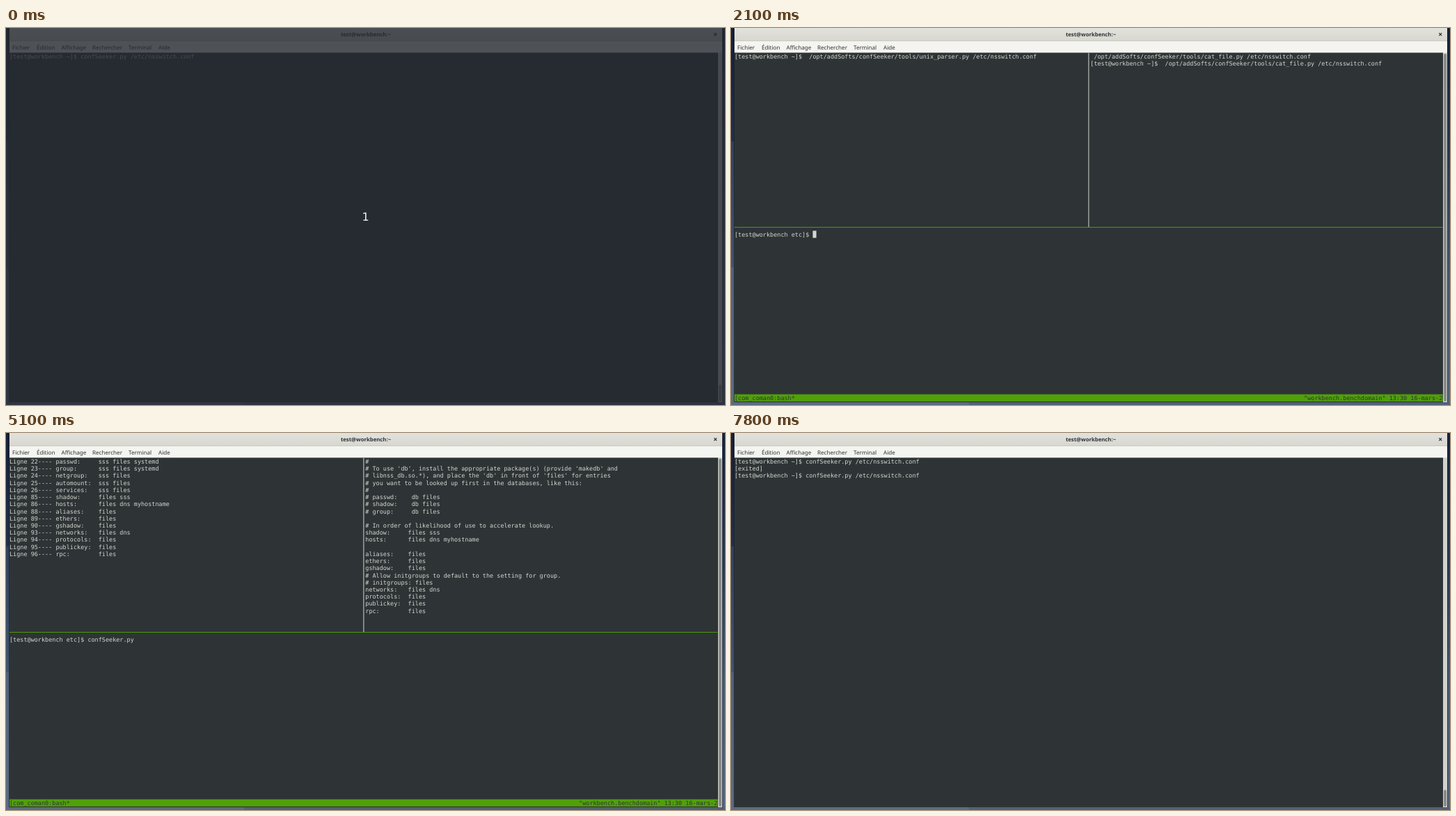
An HTML page with a canvas that plays this animation: 1033x542 px, repeating every 8 s.

```html
<!DOCTYPE html>
<html lang="fr">
<head>
<meta charset="utf-8">
<style>
html, body { margin: 0; width: 100%; height: 100%; overflow: hidden; background: #2e3436; }
canvas { display: block; }
</style>
</head>
<body>
<canvas id="stage" width="1033" height="542"></canvas>
<script>
const ctx = document.getElementById('stage').getContext('2d');
const LOOP = 8000, LEFT = 5, TOP = 36, CELL_W = 5.113, CELL_H = 10.22;
const DARK = '#2e3436', LIGHT = '#d3d7cf', GREEN = '#4e9a06';

const HOST = 'workbench';
const PROMPT = `[test@${HOST} ~]$ `;
const FILE = '/etc/nsswitch.conf';
const COMMAND = `confSeeker.py ${FILE}`;
const TOOLS = ' /opt/addSofts/confSeeker/tools/';

const entry = (key, value) => (key + ':').padEnd(12) + value;

const parsed = [
  [22, 'passwd', 'sss files systemd'], [23, 'group', 'sss files systemd'],
  [24, 'netgroup', 'sss files'], [25, 'automount', 'sss files'],
  [26, 'services', 'sss files'], [85, 'shadow', 'files sss'],
  [86, 'hosts', 'files dns myhostname'], [88, 'aliases', 'files'],
  [89, 'ethers', 'files'], [90, 'gshadow', 'files'],
  [93, 'networks', 'files dns'], [94, 'protocols', 'files'],
  [95, 'publickey', 'files'], [96, 'rpc', 'files']
].map(([line, key, value]) => `Ligne ${line}---- ${entry(key, value)}`);

const listing = [
  '#',
  "# To use 'db', install the appropriate package(s) (provide 'makedb' and",
  "# libnss_db.so.*), and place the 'db' in front of 'files' for entries",
  '# you want to be looked up first in the databases, like this:',
  '#',
  '# passwd:    db files',
  '# shadow:    db files',
  '# group:     db files',
  '',
  '# In order of likelihood of use to accelerate lookup.',
  entry('shadow', 'files sss'),
  entry('hosts', 'files dns myhostname'),
  '',
  entry('aliases', 'files'),
  entry('ethers', 'files'),
  entry('gshadow', 'files'),
  '# Allow initgroups to default to the setting for group.',
  '# initgroups: files',
  entry('networks', 'files dns'),
  entry('protocols', 'files'),
  entry('publickey', 'files'),
  entry('rpc', 'files')
];

// [start ms, text typed in the lower pane]
const typing = [
  [2100, ''], [4300, 'con'], [4500, 'conf'], [4600, 'confSeeker.py '],
  [5500, 'confSeeker.py c'], [5600, 'confSeeker.py cl'],
  [5800, 'confSeeker.py clo'], [6200, 'confSeeker.py close']
];
// Times at which the cursor turns on and off
const cursorOn = [
  [400, 1000], [1600, 2400], [3000, 3600], [4200, 5100], [5500, 6900], [7300, 7800]
];

function rect(x, y, w, h, fill) {
  ctx.fillStyle = fill;
  ctx.fillRect(x, y, w, h);
}

function gradient(y0, y1, ...colors) {
  const g = ctx.createLinearGradient(0, y0, 0, y1);
  colors.forEach((c, i) => g.addColorStop(i / (colors.length - 1), c));
  return g;
}

function label(text, x, y, font, color = DARK, align = 'left') {
  ctx.font = font;
  ctx.fillStyle = color;
  ctx.textAlign = align;
  ctx.fillText(text, x, y);
}

function print(text, row, col = 0, color = LIGHT) {
  label(text, LEFT + col * CELL_W, TOP + row * CELL_H + 8,
    '8.49px "DejaVu Sans Mono", monospace', color);
}

const printAll = (lines, col) => lines.forEach((line, row) => print(line, row, col));

function drawWindow(split) {
  rect(0, 0, 1033, 542, gradient(0, 542, '#18223a', '#2b3a55', '#4a5b74', '#58687e'));
  rect(0, 0, 4, 163, gradient(0, 163, '#151f36', '#22304b'));
  rect(0, 163, 4, 181, gradient(163, 344, '#31415c', '#43546e'));
  rect(0, 344, 4, 198, gradient(344, 542, '#506179', '#5c6c80'));
  rect(0, 538, 342, 4, '#5d6c80');
  rect(342, 538, 691, 4, '#526177');
  rect(4, 0, 1026, 538, 'rgba(20,26,36,.6)');
  rect(5, 0, 1024, 19, gradient(0, 19, '#e2e2dc', '#d7d7d0'));
  rect(5, 18.5, 1024, .5, '#bdbdb6');
  rect(5, 19, 1024, 17, '#f4f4f0');
  rect(5, 35.5, 1018, 502.5, DARK);
  rect(1023, 35.5, 6, 502.5, '#d1d2cb');

  ctx.fillStyle = '#888b88';
  ctx.beginPath();
  ctx.roundRect(1024, split ? 37 : 513, 4, split ? 500 : 24, 2);
  ctx.fill();

  label(`test@${HOST}:~`, 517, 11.8, 'bold 7.75px "Noto Sans", sans-serif', DARK, 'center');
  ctx.strokeStyle = DARK;
  ctx.lineWidth = 1.2;
  ctx.beginPath();
  ctx.moveTo(1017.3, 7.2); ctx.lineTo(1021.1, 11);
  ctx.moveTo(1021.1, 7.2); ctx.lineTo(1017.3, 11);
  ctx.stroke();

  const menu = { Fichier: 9, 'Édition': 44, Affichage: 79.5, Rechercher: 124, Terminal: 176, Aide: 219 };
  for (const name in menu) label(name, menu[name], 30.7, '8.1px "Noto Sans", sans-serif');
}

// Each scene returns the cursor position as [row, col].
function shellScene(t) {
  print(PROMPT + COMMAND, 0);
  if (t < 1800) return [0, 52];
  if (t < 2100) return [1, 0];
  print('[exited]', 1);
  if (t < 6900) return [2, 0];
  print(PROMPT + (t < 7300 ? '' : COMMAND), 2);
  return [2, t < 7300 ? 20 : 52];
}

function splitScene(t) {
  if (t < 2300) {
    const cat = `${TOOLS}cat_file.py ${FILE}`;
    print(`${PROMPT}${TOOLS}unix_parser.py ${FILE}`, 0);
    printAll([cat, PROMPT + cat], 100);
    ctx.textAlign = 'left';
  } else {
    printAll(parsed, 0);
    printAll(listing, 100);
  }
  rect(513.4, TOP, 1, 250, LIGHT);
  rect(5, 286, 1017.5, 1, GREEN);
  rect(5, 526.6, 1017.5, 10.3, '#50a009');
  print('[com_coman0:bash*', 48, 0, DARK);
  print(`"${HOST}.benchdomain" 13:30 16-mars-2`, 48, 160, DARK);

  const typed = typing.findLast(([start]) => t >= start)[1];
  print(`[test@${HOST} etc]$ ${typed}`, 25);
  return t < 6400 ? [25, 22 + typed.length] : [26, 0];
}

function draw(t) {
  const split = t >= 2100 && t < 6500;
  drawWindow(split);
  const [row, col] = split ? splitScene(t) : shellScene(t);
  if (cursorOn.some(([on, off]) => t >= on && t < off)) {
    rect(LEFT + col * CELL_W, TOP + row * CELL_H, CELL_W, CELL_H, LIGHT);
  }
  if (t < 100) {
    rect(0, 0, 1033, 542, 'rgba(37,41,48,.8)');
    label('1', 516.5, 277, '16px "DejaVu Sans", sans-serif', '#f2f2f2', 'center');
  }
}

ctx.textRendering = 'geometricPrecision';
const begin = performance.now();
function tick() {
  draw((performance.now() - begin) % LOOP);
  requestAnimationFrame(tick);
}
tick();
</script>
</body>
</html>
```
